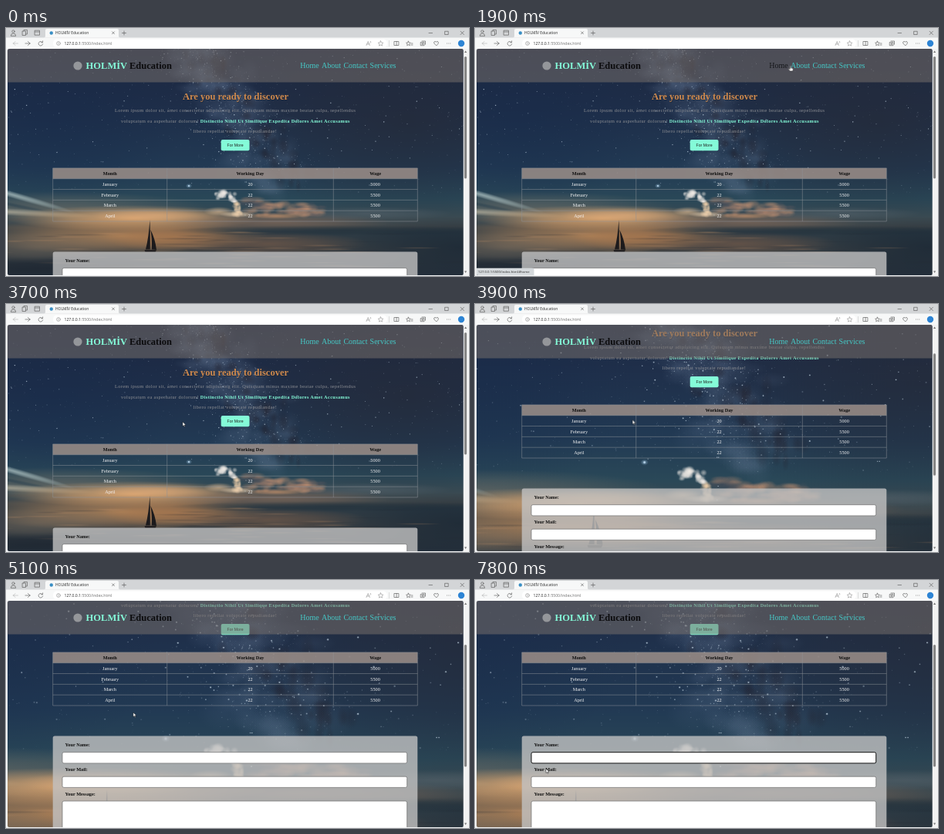
These frames come from a looping animation (600x322 px, 8 s). An HTML page with a canvas:

```html
<!DOCTYPE html>
<html lang="en">
<head>
<meta charset="utf-8">
<title>HOLMİV Education</title>
<style>
html, body { margin: 0; width: 100%; height: 100%; overflow: hidden; background: #f3f4f5; }
#stage { position: absolute; left: 0; top: 0; width: 600px; height: 322px; overflow: hidden; }
#view { position: absolute; left: 1.5px; top: 27px; width: 591px; height: 294px; overflow: hidden; border-radius: 3px 3px 2px 2px; }
#sky { position: absolute; left: -1.5px; top: -27px; width: 600px; height: 322px; transform-origin: 297px 27px; }
svg { position: absolute; left: 0; top: 0; }
text { white-space: pre; }
#page, #bar { font: 6.25px "Liberation Serif", serif; }
.ui { font-family: "Noto Sans", sans-serif; font-size: 5.08px; fill: #333; }
.b { font-weight: bold; }
.mid { text-anchor: middle; }
.para { letter-spacing: .39px; fill: #8d8f94; }
.aqua { fill: #84fbd8; }
.field { fill: #fff; stroke: #6d6d6d; stroke-width: .7; }
.line { fill: none; stroke: #5c5c5c; stroke-width: .65; stroke-linecap: round; stroke-linejoin: round; }
.nav { font-size: 10px; fill: #45c8c6; }

#sky, #page, #thumb, #cursor, #arrow, #hand, #beam, #status, #status .hash, .nav, #name { animation: 8s linear infinite; }
#sky { animation-name: zoom; }
#page { animation-name: scroll; }
#thumb { animation-name: thumb; }
#cursor { animation-name: path; }
#arrow { animation-name: arrow; animation-timing-function: step-end; }
#hand { animation-name: hand; animation-timing-function: step-end; }
#beam { animation-name: beam; animation-timing-function: step-end; }
#name { animation-name: focus; animation-timing-function: step-end; }
#status { animation-name: status; }
.nav { animation-name: hot; animation-timing-function: step-end; animation-delay: var(--at); }
#status .hash { opacity: 0; animation-name: hash; animation-timing-function: step-end; animation-delay: var(--at); }
.l0 { --at: 1.9s; }
.l1 { --at: 1.7s; }
.l2 { --at: 1.5s; }
.nav.l3 { animation-name: hotFirst; }
#status .l3 { animation-name: hashFirst; }

@keyframes zoom {
  0%, 47.5% { transform: none; animation-timing-function: ease-out; }
  50.6%, 100% { transform: translateY(-88px) scale(1.5); }
}
@keyframes scroll {
  0%, 47.5% { transform: translateY(0); animation-timing-function: ease-out; }
  50.6%, 100% { transform: translateY(-88px); }
}
@keyframes thumb {
  0%, 47.5% { transform: translateY(0); animation-timing-function: ease-out; }
  50.6%, 100% { transform: translateY(47px); }
}
@keyframes path {
  0% { transform: translate(604px, 110px); }
  10% { transform: translate(486px, 48px); }
  12.5% { transform: translate(480px, 45px); }
  17.5% { transform: translate(476px, 46px); }
  26.25% { transform: translate(382px, 50px); }
  33.75% { transform: translate(320.5px, 102.5px); }
  40%, 42% { transform: translate(250px, 143px); }
  46.25% { transform: translate(229px, 153px); }
  51.25% { transform: translate(179.5px, 148px); }
  56.25%, 58% { transform: translate(174px, 152px); }
  78.75%, 91% { transform: translate(141px, 224px); }
  95%, 96.3% { transform: translate(96px, 244px); }
  97.5%, 100% { transform: translate(92px, 245px); }
}
@keyframes arrow { 0% { opacity: 1; } 10% { opacity: 0; } 26.25% { opacity: 1; } 78% { opacity: 0; } 91.5%, 100% { opacity: 1; } }
@keyframes hand { 0% { opacity: 0; } 10% { opacity: 1; } 26.25%, 100% { opacity: 0; } }
@keyframes beam { 0% { opacity: 0; } 78% { opacity: 1; } 91.5%, 100% { opacity: 0; } }
@keyframes focus { 0% { stroke: #6d6d6d; stroke-width: .7px; } 87.5%, 100% { stroke: #101010; stroke-width: 1px; } }
@keyframes status { 0%, 10% { opacity: 0; } 10.1%, 28% { opacity: 1; } 31%, 100% { opacity: 0; } }
@keyframes hot { 0% { fill: #15171a; } 2.5%, 100% { fill: #45c8c6; } }
@keyframes hotFirst { 0% { fill: #45c8c6; } 10% { fill: #15171a; } 18.75%, 100% { fill: #45c8c6; } }
@keyframes hash { 0% { opacity: 1; } 2.5%, 100% { opacity: 0; } }
@keyframes hashFirst { 0% { opacity: 0; } 10% { opacity: 1; } 18.75%, 100% { opacity: 0; } }
</style>
</head>
<body>
<div id="stage">
<div id="view"><canvas id="sky" width="1200" height="644"></canvas></div>
<svg width="600" height="322" viewBox="0 0 600 322">
  <defs><clipPath id="clip"><rect x="1.5" y="27" width="591" height="294" rx="3"/></clipPath></defs>

  <g clip-path="url(#clip)">
    <g id="page">
      <text x="229.6" y="94" class="b" font-size="12.5" fill="#1b2433" opacity=".7">Are you ready to discover</text>
      <text x="229" y="93.3" class="b" font-size="12.5" fill="#cf8a4e">Are you ready to discover</text>
      <g class="para">
        <text x="141" y="108.8">Lorem ipsum dolor sit, amet consectetur adipisicing elit. Quisquam minus maxime beatae culpa, repellendus</text>
        <text x="149" y="122.6">voluptatum ea aspernatur dolorum! <tspan class="b aqua">Distinctio Nihil Ut Similique Expedita Dolores Amet Accusamus</tspan></text>
        <text x="242.5" y="136.3">libero repellat voluptate repudiandae!</text>
      </g>
      <rect x="278.7" y="145" width="36.8" height="14.2" rx="2" class="aqua"/>
      <text x="297" y="154" class="mid" font-family="Liberation Sans, sans-serif" font-size="5.2" fill="#222">For More</text>
      <g id="table"></g>
      <g id="form">
        <rect x="60.7" y="290.6" width="472.6" height="180" rx="2.5" fill="#c2c2c2" fill-opacity=".8"/>
        <g class="b" fill="#111">
          <text x="76.5" y="304">Your Name:</text>
          <text x="76.5" y="335.6">Your Mail:</text>
          <text x="76.5" y="367.5">Your Message:</text>
        </g>
        <rect id="name" class="field" x="73" y="311.7" width="446.7" height="14.2" rx="2"/>
        <rect class="field" x="73" y="343.2" width="446.7" height="14.2" rx="2"/>
        <rect class="field" x="73" y="375" width="446.7" height="60" rx="2"/>
      </g>
    </g>

    <g id="bar">
      <rect x="1.5" y="27" width="591" height="43.5" fill="#76706c" fill-opacity=".54"/>
      <circle cx="93" cy="49" r="5.6" fill="#94969a"/>
      <text x="103.6" y="53.2" class="b" font-size="12.5"><tspan class="aqua">HOLMİV</tspan><tspan fill="#0c0c0e"> Education</tspan></text>
      <text x="381.3" y="52.4" class="nav l0">Home</text>
      <text x="409" y="52.4" class="nav l1">About</text>
      <text x="437.4" y="52.4" class="nav l2">Contact</text>
      <text x="471.6" y="52.4" class="nav l3">Services</text>
    </g>

    <g id="status">
      <rect x="1.5" y="311.8" width="75" height="10" rx="1" fill="#d5d9dc"/>
      <g class="ui" style="font-size:4.28px">
        <text x="4" y="318.2">127.0.0.1:5500/index.html</text>
        <text x="56.2" y="318.2" class="hash l0">#home</text>
        <text x="56.2" y="318.2" class="hash l1">#about</text>
        <text x="56.2" y="318.2" class="hash l2">#contact</text>
        <text x="56.2" y="318.2" class="hash l3">#services</text>
      </g>
    </g>
  </g>

  <g id="browser">
    <rect width="600" height="13" fill="#d3d5d7"/>
    <rect y="12.5" width="600" height="14.5" fill="#f7f8f8"/>
    <path d="M49 12.6q2 0 2-2V3q0-2 2-2h91q2 0 2 2v7.6q0 2 2 2z" fill="#f7f8f8"/>
    <rect x="61" y="14.5" width="433" height="11" rx="5" fill="#fff"/>
    <circle cx="58.8" cy="6.5" r="2.2" fill="#3a8fc4"/>
    <text x="64" y="8.3" class="ui" style="font-size:4.9px">HOLMİV Education</text>
    <g class="line">
      <circle cx="9.5" cy="4.5" r="1.7"/><path d="M6.3 10q0-3 3.2-3t3.2 3z"/>
      <path d="M21.5 4h4v5.5h-4zM23 4V2.5h4.5V8H25.5"/>
      <path d="M37.5 3.2h6v6h-6zM37.5 5h6"/>
      <path d="M137.5 4.8l3 3m0-3l-3 3M153 4v5m-2.5-2.5h5"/>
      <path d="M548 6.5h4.5M569 4.3h4.2v4.2H569zM589 4.2l4.4 4.4m0-4.4l-4.4 4.4"/>
      <path d="M9.5 20h6m-6 0l2.5-2.5m-2.5 2.5l2.5 2.5" opacity=".4"/>
      <path d="M25 20h6m0 0l-2.5-2.5m2.5 2.5l-2.5 2.5"/>
      <path d="M47.3 18.7a2.8 2.8 0 1 0 .4 2.2M47.6 16.8v2h-2"/>
      <g opacity=".65">
        <circle cx="68" cy="20" r="2.4"/><path d="M68 19.8v1.3M68 18.7v.1"/>
        <path d="M467 22.5l2.2-5 2.2 5m-3.6-1.6h2.8M472.4 17.3q1 1 0 2"/>
        <path d="M485.5 16.8l1 2.1 2.3.3-1.7 1.6.4 2.3-2-1.1-2 1.1.4-2.3-1.7-1.6 2.3-.3z"/>
      </g>
      <path d="M503.3 17.5h5.6v5h-5.6zM506.1 17.5v5"/>
      <path d="M521.5 17.2l.9 1.8 2 .3-1.5 1.4.4 2-1.8-1-1.8 1 .4-2-1.5-1.4 2-.3zM525 22h2m-1.6-2h1.6"/>
      <path d="M537.6 18.5h4.4v4.2h-4.4zM539 17h4.5v4.2M539.8 19.5v2.2m-1.1-1.1h2.2"/>
      <path d="M557.5 22.7l-2.7-2.7q-.8-2.3 1.2-2.6 1.1 0 1.5 1 .4-1 1.5-1 2 .3 1.2 2.6z"/>
      <path d="M571.5 20h.1m2 0h.1m2 0h.1"/>
    </g>
    <path d="M496.5 16v8" stroke="#ccc" stroke-width=".6"/>
    <circle cx="590" cy="20" r="4.2" fill="#2d84d4"/>
    <text x="75.5" y="21.9" class="ui">127.0.0.1<tspan fill="#777">:5500/index.html</tspan></text>
    <rect x="592.7" y="27" width="5.8" height="294" fill="#f2f2f2"/>
    <path d="M594 32l1.6-2.4 1.6 2.4zM594 315.5l1.6 2.4 1.6-2.4z" fill="#777"/>
    <rect id="thumb" x="593.9" y="37" width="3.2" height="158.5" rx="1.6" fill="#858585"/>
  </g>

  <g id="cursor">
    <path id="arrow" d="M0 0v5.6l1.3-1.2.9 1.9.9-.4-.9-1.9h1.8z" fill="#fff" stroke="#111" stroke-width=".45"/>
    <path id="hand" d="M-.6.5q.6-.9 1.2 0v2.4l2.1.5q.9.2.8 1.2L3 7H-.7l-1.9-2.7q.2-.9 1.1-.3l.9.8z" fill="#fff" stroke="#222" stroke-width=".45"/>
    <path id="beam" d="M-1.2-3H1.2M0-3v6M-1.2 3H1.2" fill="none" stroke="#333" stroke-width=".6"/>
  </g>
</svg>
</div>

<script>
const rows = [
  ["Month", "Working Day", "Wage"],
  ["January", 20, 5000],
  ["February", 22, 5500],
  ["March", 22, 5500],
  ["April", 22, 5500]
];
const top0 = 181.9, rowH = 13.82, centers = [134.8, 316.5, 478.6];
let markup = `<rect x="60.7" y="${top0}" width="472.6" height="${rowH}" fill="#9b8e89" fill-opacity=".86"/>`;
rows.forEach((row, r) => {
  const y = top0 + r * rowH;
  row.forEach((cell, c) => {
    markup += `<text x="${centers[c]}" y="${y + 9}" class="mid${r ? "" : " b"}" fill="${r ? "#f4f4f4" : "#0e0e0e"}">${cell}</text>`;
  });
  if (r) markup += `<path d="M60.7 ${y}h472.6" stroke="#8d9299" stroke-width=".5"/>`;
});
markup += `<path d="M60.7 ${top0}h472.6v${rowH * 5}h-472.6zM208.7 ${top0}v${rowH * 5}M424.3 ${top0}v${rowH * 5}" fill="none" stroke="#8d9299" stroke-width=".5"/>`;
document.getElementById("table").innerHTML = markup;

const ctx = document.getElementById("sky").getContext("2d");
let seed = 41;
const rand = () => (seed = (seed * 16807) % 2147483647) / 2147483647;
const spread = n => (rand() + rand() + rand() - 1.5) * n;

function glow(x, y, rx, ry, rgb, alpha, turn = 0) {
  ctx.save();
  ctx.translate(x, y);
  ctx.rotate(turn);
  ctx.scale(rx, ry);
  const g = ctx.createRadialGradient(0, 0, 0, 0, 0, 1);
  g.addColorStop(0, `rgba(${rgb},${alpha})`);
  g.addColorStop(.5, `rgba(${rgb},${alpha * .6})`);
  g.addColorStop(1, `rgba(${rgb},0)`);
  ctx.fillStyle = g;
  ctx.fillRect(-1, -1, 2, 2);
  ctx.restore();
}

function dot(x, y, r, alpha) {
  ctx.fillStyle = `rgba(205,222,236,${alpha})`;
  ctx.beginPath();
  ctx.arc(x, y, r, 0, 7);
  ctx.fill();
}

// centre line of the star band
const band = t => [238 + 115 * t, 15 + 185 * t];

function paintStars() {
  for (let i = 0; i < 150; i++) {
    const [x, y] = band(rand() ** 1.3);
    glow(x + spread(46), y + spread(24), 8 + rand() * 18, 6 + rand() * 14, "112,132,160", .1);
  }
  for (let i = 0; i < 70; i++) {
    const [x, y] = band(rand());
    glow(x + 14 + spread(30), y + spread(20), 3 + rand() * 8, 5 + rand() * 10, "34,34,46", .28);
  }
  for (let i = 0; i < 2000; i++) {
    const inBand = i % 2 === 0;
    const [bx, by] = band(rand() ** 1.3);
    const x = inBand ? bx + spread(60) : rand() * 600;
    const y = inBand ? by + spread(24) : 20 + rand() ** 1.2 * 195;
    dot(x, y, .2 + rand() ** 4 * .55, (.2 + rand() * .55) * (y > 185 ? .5 : 1));
  }
}

function paintDusk() {
  // bands fanning out on the left
  glow(70, 234, 190, 22, "112,112,104", .6);
  glow(10, 217, 85, 4.5, "176,196,196", .75, .28);
  glow(0, 228, 70, 3, "44,66,80", .7, .2);
  glow(8, 239, 110, 5, "186,180,160", .7, .05);
  glow(12, 249, 100, 3, "70,76,78", .6);

  // glowing horizon and water
  glow(165, 247, 165, 17, "222,168,114", .95);
  glow(195, 243, 85, 10, "226,172,122", .6);
  glow(150, 270, 190, 25, "196,142,92", .8);
  glow(215, 272, 90, 18, "184,124,76", .55);
  glow(40, 284, 120, 22, "132,116,98", .5);
  glow(350, 252, 150, 12, "152,116,94", .55);
  glow(340, 280, 130, 16, "136,100,76", .55);
  glow(470, 241, 110, 9, "92,104,112", .5);
}

function paintCloud() {
  for (let i = 0; i < 70; i++) {
    const t = rand();
    const x = 305 + 105 * t, y = 243 - rand() * 24 * (1 - t * .55);
    glow(x, y, 5 + rand() * 9, 2 + rand() * 4, i % 3 ? "206,150,116" : "84,84,92", .4);
  }
  glow(318, 228, 18, 7, "66,74,86", .75);
  // bright rim curling over the top and down
  for (let i = 0; i < 48; i++) {
    const t = rand(), a = -2.7 + t * 3;
    const x = 283 + Math.cos(a) * 13 + t * 5, y = 224 + Math.sin(a) * 10 + t * t * 14;
    glow(x + spread(4), y + spread(4), 2 + rand() * 4, 2 + rand() * 3, t < .7 ? "246,240,234" : "250,216,176", .55);
  }
  glow(276, 238, 20, 6, "238,196,152", .6);
  glow(300, 242, 24, 4, "250,218,182", .7);
  glow(350, 244, 40, 4, "226,160,110", .6);
}

function paintSky() {
  ctx.scale(2, 2);
  const base = ctx.createLinearGradient(0, 27, 0, 322);
  [[0, "#1c2740"], [.28, "#1f2f4a"], [.52, "#223a54"], [.66, "#2a4858"], [.74, "#3a4a52"],
   [.785, "#41474a"], [.81, "#2c3a44"], [.88, "#343c42"], [1, "#232e3a"]]
    .forEach(([at, color]) => base.addColorStop(at, color));
  ctx.fillStyle = base;
  ctx.fillRect(0, 0, 600, 322);
  glow(520, 120, 240, 130, "38,42,54", .65);
  glow(60, 120, 170, 120, "22,42,74", .45);

  paintStars();
  paintDusk();
  glow(440, 263, 230, 7, "38,52,62", .85);
  glow(590, 285, 150, 40, "24,38,52", .7);
  paintCloud();

  for (let i = 0; i < 80; i++) {
    const shade = i % 2 ? "196,146,104" : "36,42,50";
    glow(260 + spread(300), 262 + rand() * 50, 16 + rand() * 30, .6 + rand(), shade, .25);
  }
  glow(60, 312, 240, 15, "30,38,48", .7);

  dot(237, 205, 1.1, 1);
  glow(237, 205, 4, 3, "150,190,220", .6);
  [[239.5, 132], [310, 200], [311.5, 200], [311, 229], [310, 243], [471, 204], [473, 204]]
    .forEach(([x, y]) => dot(x, y, .5, .8));

  // boat
  ctx.fillStyle = "#1c1a1c";
  ctx.fill(new Path2D("M186.4 249q.6 20 .3 38.5H181q4-16 5.4-38.5zM187.4 262q6 12 7.6 26l-6-.5q.2-14-1.6-25.5zM179.5 288.3h15.5l-1.5 2.7h-13z"));
}
paintSky();
</script>
</body>
</html>
```
